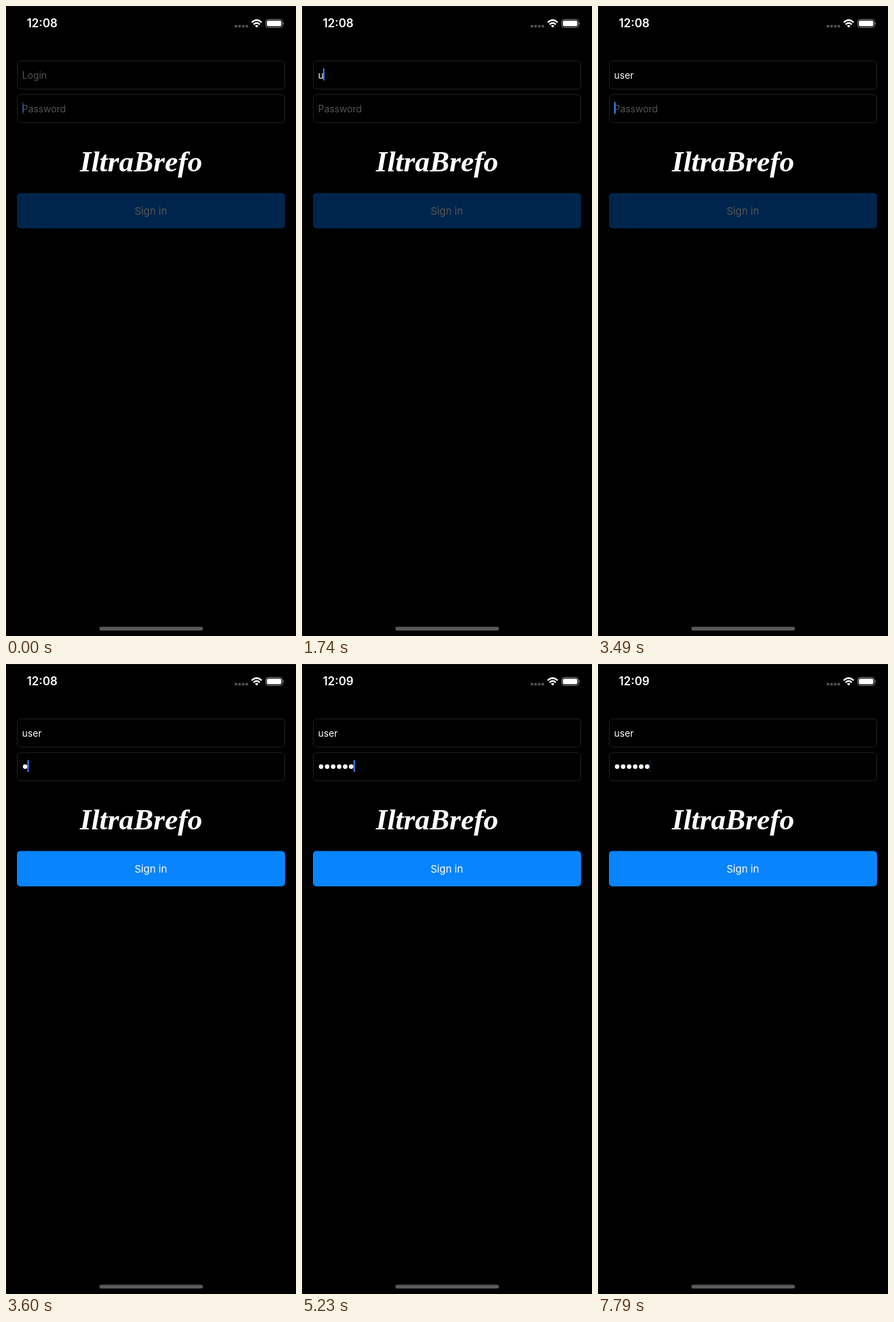
Write an HTML page that moves like this. It is 424 px wide and 918 px high and loops after 8 s.

```html
<!DOCTYPE html>
<html lang="en">
<head>
<meta charset="utf-8">
<title>Sign in</title>
<style>
  html, body { margin: 0; width: 100%; height: 100%; overflow: hidden; background: #000; }
  svg { display: block; width: 100%; height: 100%; }
  text { font-family: Inter, Roboto, sans-serif; font-size: 13.8px; fill: #fff; }
  .hint { fill: #545454; }
  .field { fill: #000; stroke: #222; }
  #clock { font-size: 16.8px; font-weight: 600; }
  #label { font-size: 14.8px; text-anchor: middle; }
  #brand { font: italic bold 43px "Liberation Serif", serif; text-anchor: middle; }
</style>
</head>
<body>
<svg viewBox="0 0 424 918">
  <rect width="424" height="918"/>
  <path d="M.5 918V.5H424" fill="none" stroke="#111"/>

  <text id="clock" x="30.5" y="31.4"></text>
  <g fill="#555">
    <circle cx="336.3" cy="29.5" r="2"/>
    <circle cx="341.6" cy="29.5" r="2"/>
    <circle cx="346.9" cy="29.5" r="2"/>
    <circle cx="352.2" cy="29.5" r="2"/>
  </g>
  <g fill="none" stroke="#fff" stroke-width="2.4">
    <path d="M359.2 23.8Q366.5 17 373.8 23.8"/>
    <path d="M361.9 26.8Q366.5 22.6 371.1 26.8"/>
  </g>
  <path d="M363.9 28.7Q366.5 26.6 369.1 28.7L366.5 31.4Z" fill="#fff"/>
  <rect x="379.7" y="19.5" width="24.6" height="11.8" rx="3.5" fill="none" stroke="#888"/>
  <rect x="381.4" y="21.2" width="21.2" height="8.4" rx="2" fill="#fff"/>
  <path d="M405.3 23.4Q407.6 25.4 405.3 27.4Z" fill="#888"/>

  <rect class="field" x="16.5" y="80" width="391" height="41" rx="5"/>
  <rect class="field" x="16.5" y="129" width="391" height="41" rx="5"/>
  <text id="loginHint" class="hint" x="23.6" y="105.5">Login</text>
  <text id="login" x="23.6" y="105.5"></text>
  <text id="passHint" class="hint" x="23.6" y="154.5">Password</text>
  <g id="dots" fill="#fff"></g>
  <rect id="caret" width="2.2" height="17.4" fill="#3f78f0"/>

  <text id="brand" x="197.5" y="241">IltraBrefo</text>

  <rect id="button" x="16" y="272.5" width="392" height="51.5" rx="5"/>
  <text id="label" x="211.7" y="304">Sign in</text>

  <rect x="136.5" y="904.5" width="151.5" height="5.5" rx="2.75" fill="#595959"/>
</svg>
<script>
  const LOOP = 8000;
  const LOGIN_FOCUS = 1160, PASS_FOCUS = 2560, CLOCK_TICK = 4180;
  const loginKeys = [1740, 1860, 1980, 2320];
  const passKeys = [3600, 4180, 4420, 4420, 4650, 5230];
  // [time, opacity] of the blinking caret
  const blink = [
    [0, .35], [230, 1], [530, 1], [850, .15], [1100, .15], [1160, 1],
    [3000, 1], [3200, .15], [3400, .15], [3490, 1],
    [5290, 1], [5520, .2], [5700, .2], [5810, 1],
    [6100, 1], [6480, .18], [6740, .18], [6860, 1],
    [7150, 1], [7530, .18], [8000, .18]
  ];

  const el = id => document.getElementById(id);
  const show = (node, on) => node.setAttribute("visibility", on ? "visible" : "hidden");
  const typed = (keys, t) => keys.filter(k => t >= k).length;

  const dots = passKeys.map((_, i) => {
    const dot = document.createElementNS("http://www.w3.org/2000/svg", "circle");
    dot.setAttribute("cx", 28 + 8.8 * i);
    dot.setAttribute("cy", 149.6);
    dot.setAttribute("r", 3.3);
    return el("dots").appendChild(dot);
  });

  function caretOpacity(t) {
    const i = blink.findIndex(([time]) => time > t);
    const [t0, a0] = blink[i - 1], [t1, a1] = blink[i];
    return a0 + (a1 - a0) * (t - t0) / (t1 - t0);
  }

  function draw(t) {
    const letters = typed(loginKeys, t);
    const chars = typed(passKeys, t);
    const onLogin = t >= LOGIN_FOCUS && t < PASS_FOCUS;
    const ready = chars > 0;

    el("clock").textContent = t < CLOCK_TICK ? "12:08" : "12:09";
    el("login").textContent = "user".slice(0, letters);
    show(el("loginHint"), !letters);
    show(el("passHint"), !chars);
    dots.forEach((dot, i) => show(dot, i < chars));

    const loginWidth = letters ? el("login").getComputedTextLength() : 0;
    const width = onLogin ? loginWidth : 8.8 * chars;
    el("caret").setAttribute("x", 23.5 + Math.max(0, width - 1));
    el("caret").setAttribute("y", onLogin ? 91 : 139.8);
    el("caret").setAttribute("opacity", caretOpacity(t));

    el("button").setAttribute("fill", ready ? "#0884ff" : "#00254c");
    el("label").style.fill = ready ? "#fff" : "#555";
  }

  const start = performance.now();
  function tick() {
    draw((performance.now() - start) % LOOP);
    requestAnimationFrame(tick);
  }
  tick();
</script>
</body>
</html>
```
